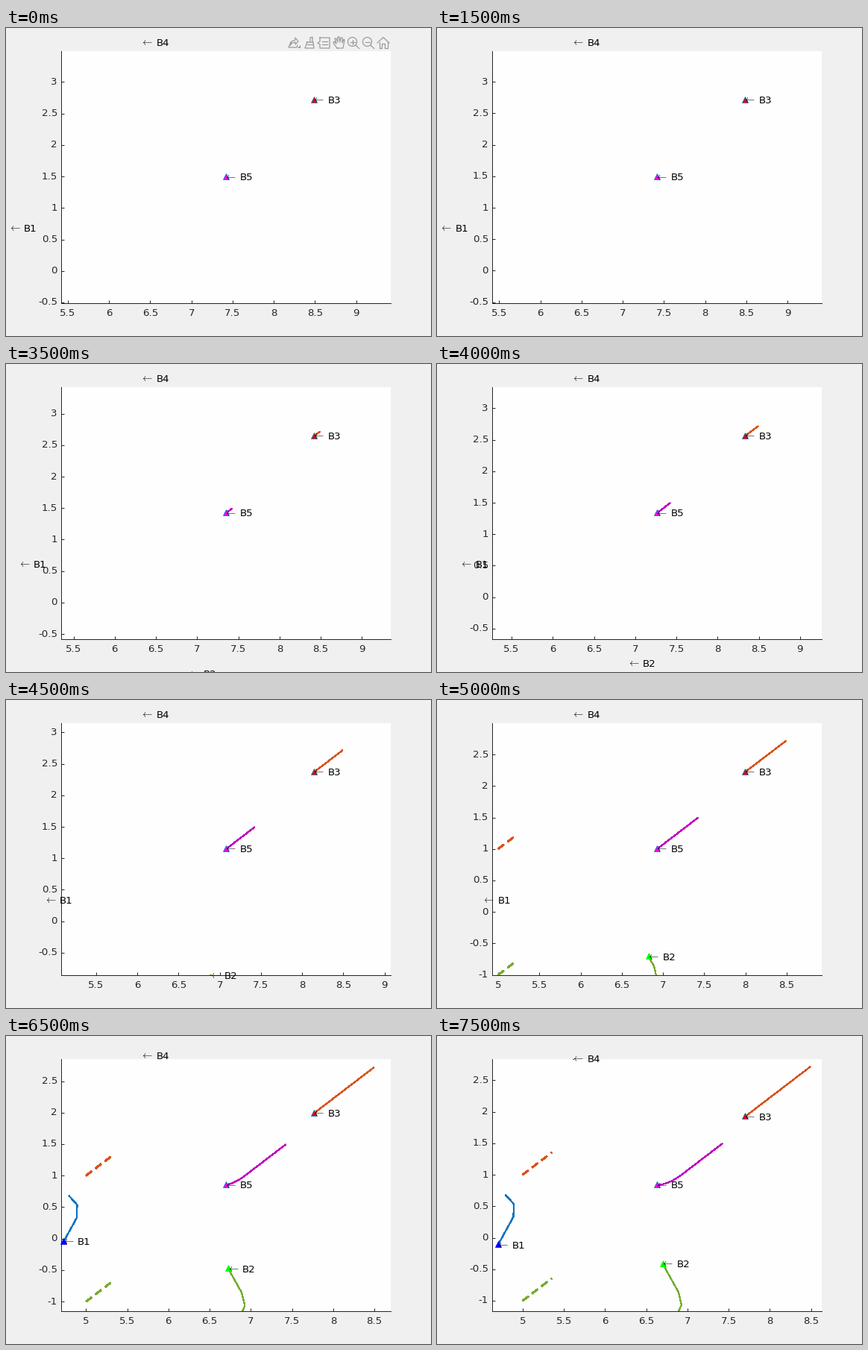
These frames come from a looping animation (570 by 413 pixels, 8000 ms). A matplotlib script:

```python
import numpy as np
import matplotlib.pyplot as plt
from matplotlib.animation import FuncAnimation
from matplotlib.ticker import FuncFormatter, MultipleLocator

W, H, DPI = 570, 413, 64
PT = 72 / DPI                                   # points per pixel
LEFT, RIGHT, TOP, BOTTOM = 74, 516, 31, 368.8
INK, EDGE, GREY = "#262626", "#0072bd", "#999999"
STEPS = 16
HOLDS = (6, 11, 14)                             # steps that repeat the one before

plt.rcParams.update({
    "font.family": "DejaVu Sans",
    "font.size": 13.33 * PT,
    "mathtext.fontset": "cm",
    "ytick.alignment": "center",
})

# vehicle: face, edge and trail colour
STYLE = {
    "B1": ("#0000ff", "#0000ff", "#0072bd"),
    "B2": ("#00ff00", "#00ff00", "#77ac30"),
    "B3": ("#ff0000", EDGE, "#d95319"),
    "B4": ("#00ffff", EDGE, "#7e2f8e"),
    "B5": ("#ff00ff", EDGE, "#bf00bf"),
}
WALLS = {1: "#d95319", -1: "#77ac30"}           # start height: colour


def travel(n):
    """Distance covered by step n: geometric growth between key steps."""
    n -= n in HOLDS
    keys = [.001, .004, .033, .07, .345, .493, .69, .79]
    return np.exp(np.interp(n, [0, 3, 5, 7, 9, 10, 12, 15], np.log(keys)))


def bend(s, *xs):
    return np.interp(s, [0, .14, .345, .79], xs)


def locate(name, s):
    """Everyone drifts down-left; B1 and B2 swerve and B5 levels off."""
    if name == "B1":
        return bend(s, 4.796, 4.893, 4.887, 4.70), .675 - s
    if name == "B2":
        return bend(s, 6.88, 6.928, 6.89, 6.70), s - 1.205
    if name == "B3":
        return 8.488 - s, 2.712 - s
    if name == "B4":
        return 6.406 - s, 3.629 - s
    return 7.42 - s, 1.491 - s + 1.5 * np.maximum(0, s - .49) ** 2


fig = plt.figure(figsize=(W / DPI, H / DPI), dpi=DPI, facecolor="#f0f0f0")
ax = fig.add_axes([LEFT / W, 1 - BOTTOM / H,
                   (RIGHT - LEFT) / W, (BOTTOM - TOP) / H], facecolor="#fefefe")
ax.spines[["top", "right"]].set_visible(False)
ax.spines[["left", "bottom"]].set(color=INK, linewidth=PT)
ax.tick_params(direction="in", length=4 * PT, width=PT, color=INK, labelcolor=INK)
ax.tick_params(axis="x", pad=7.5 * PT)
ax.tick_params(axis="y", pad=5 * PT)
for axis in (ax.xaxis, ax.yaxis):
    axis.set_major_locator(MultipleLocator(.5))
    axis.set_major_formatter(FuncFormatter(lambda v, _: f"{v + 0:g}"))

# overlay in pixel coordinates, y pointing down
over = fig.add_axes([0, 0, 1, 1])
over.set(xlim=(0, W), ylim=(H, 0))
over.axis("off")

trails, marks, arrows, labels = {}, {}, {}, {}
for name, (face, edge, trail) in STYLE.items():
    trails[name], = ax.plot([], [], color=trail, lw=1.2 * PT, aa=False)
    marks[name], = over.plot([], [], "^", ms=8.5 * PT, mfc=face, mec=edge,
                             mew=.8 * PT)
    arrows[name] = over.text(0, 0, r"$\leftarrow$", va="baseline")
    labels[name] = over.text(0, 0, name, va="baseline")
walls = {y: ax.plot([], [], color=c, lw=1.6 * PT, aa=False,
                    dash_capstyle="butt", ls=(0, (9.5 / 1.6, 6.2 / 1.6)))[0]
         for y, c in WALLS.items()}

toolbar = []


def stroke(*points):
    toolbar.extend(over.plot(*zip(*points), color=GREY, lw=1.2 * PT))


def arc(cx, cy, r):
    a = np.linspace(0, 2 * np.pi, 40)
    stroke(*zip(cx + r * np.cos(a), cy + r * np.sin(a)))


def build_toolbar():
    # export
    stroke((382, 19), (379, 26), (390, 26), (391, 23))
    stroke((381, 23), (383, 18), (388, 16), (388, 13), (392, 18), (388, 22),
           (388, 19), (384, 20), (381, 23))
    toolbar.extend(over.fill([391, 395, 395], [27, 27, 23], color=GREY, lw=0))
    # brush
    stroke((408, 19), (408, 13), (411, 12), (411, 19))
    stroke((404, 19), (412, 19), (413, 27), (401, 27), (404, 19))
    stroke((404, 22), (412, 22))
    # data tip
    stroke((421, 13), (434, 13), (434, 27), (421, 27), (421, 22),
           (418, 20), (421, 18), (421, 13))
    for y in (18, 22):
        stroke((424, y), (431, y))
    # hand
    stroke((444, 27), (439, 20), (440, 18), (443, 21), (441, 14), (443, 14),
           (445, 19), (445, 12), (447, 12), (448, 19), (449, 13), (451, 13),
           (451, 20), (453, 15), (454, 16), (452, 27), (444, 27))
    # zoom in and out
    for x in (464.5, 484.5):
        arc(x, 18.5, 6)
        stroke((x + 4.5, 23), (x + 9, 27.5))
        stroke((x - 3, 18.5), (x + 3, 18.5))
    stroke((464.5, 15.5), (464.5, 21.5))
    # home
    stroke((498, 20), (506, 12.5), (514, 20))
    stroke((500.5, 19), (500.5, 27), (504, 27), (504, 21), (508, 21),
           (508, 27), (511.5, 27), (511.5, 19))


build_toolbar()


def draw(n):
    s = travel(n)
    cx, cy = locate("B5", s)                    # the view follows B5
    ax.set(xlim=(cx - 2, cx + 2), ylim=(cy - 2, cy + 2))

    size = .55 * max(0, s - .15)
    for y, line in walls.items():
        line.set_data([5, 5 + size], [y, y + size])

    past = np.linspace(0, s, 80)
    for name in STYLE:
        trails[name].set_data(*locate(name, past))
        x, y = locate(name, s)
        px = LEFT + (x - cx + 2) / 4 * (RIGHT - LEFT)
        py = TOP + (cy + 2 - y) / 4 * (BOTTOM - TOP)
        marks[name].set_data([px], [py - 1])
        marks[name].set_visible(LEFT <= px <= RIGHT and TOP <= py <= BOTTOM)
        arrows[name].set_position((px - 2.6, py + 3.6))
        labels[name].set_position((px + 18.6, py + 4.6))

    for part in toolbar:
        part.set_visible(n == 0)
    return []


anim = FuncAnimation(fig, draw, frames=STEPS, interval=500,
                     repeat=True, repeat_delay=0, blit=False)
plt.show()
```
